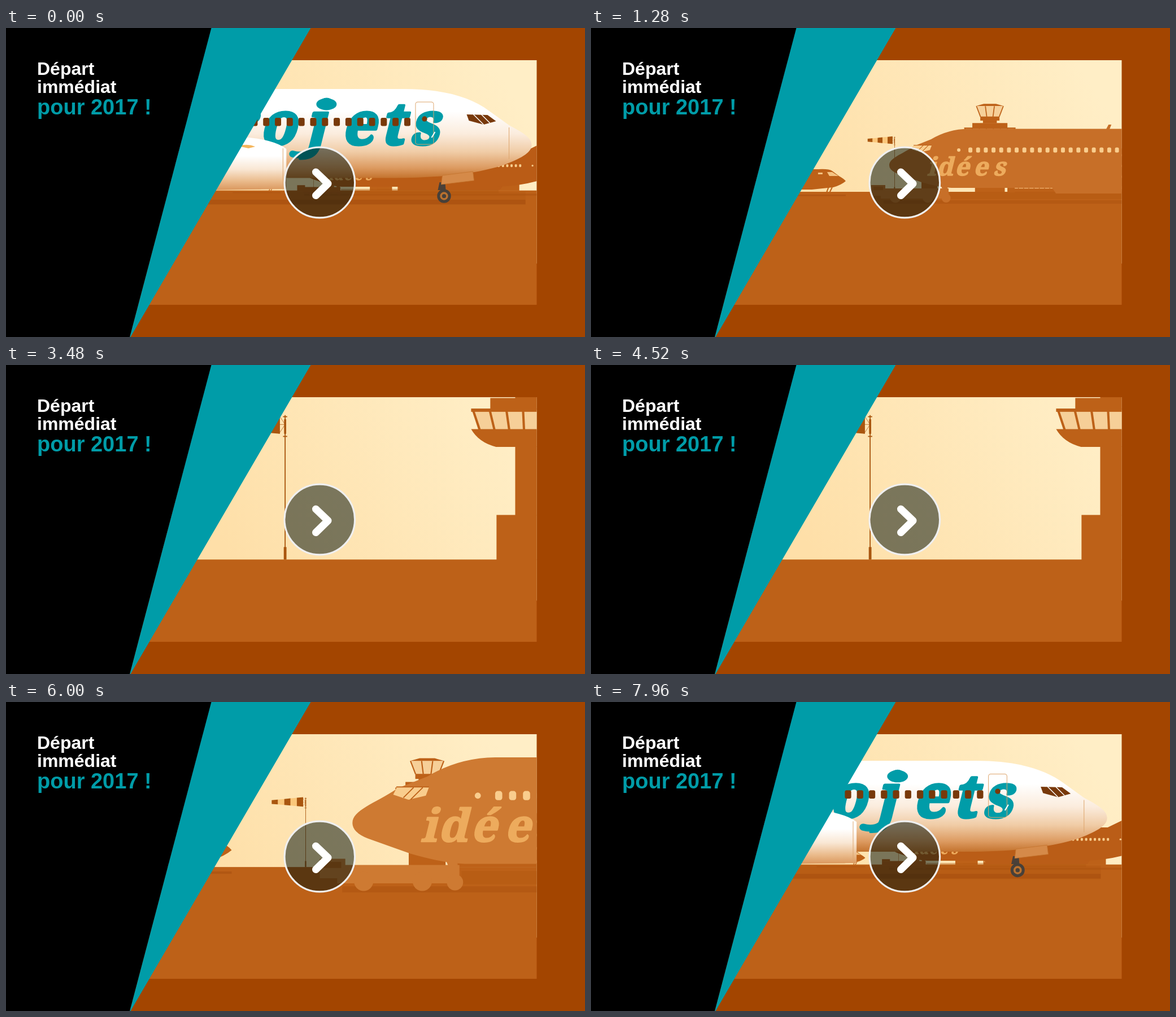
An HTML page that plays this animation: 1025 px wide and 547 px high, repeating every 8000 ms.

```html
<!DOCTYPE html>
<html lang="fr">
<head>
<meta charset="utf-8">
<title>Départ immédiat</title>
<style>
html, body { margin: 0; width: 100%; height: 100%; overflow: hidden; background: #a34500; }
svg { display: block; width: 100%; height: 100%; }
.title { font: bold 32px "Liberation Sans", Arial, sans-serif; }
.script { font-family: "Noto Serif", serif; font-weight: 900; stroke-linejoin: round; }
</style>
</head>
<body>
<svg viewBox="0 0 1025 547" preserveAspectRatio="none">
  <defs>
    <clipPath id="screen"><rect x="200" y="57" width="739.5" height="433"/></clipPath>
    <linearGradient id="sky" gradientUnits="userSpaceOnUse" x1="860" y1="57" x2="400" y2="345">
      <stop offset="0" stop-color="#ffeec6"/><stop offset="1" stop-color="#fedfa8"/>
    </linearGradient>
    <linearGradient id="hull" gradientUnits="userSpaceOnUse" x1="0" y1="108" x2="0" y2="267">
      <stop offset=".25" stop-color="#fff"/><stop offset=".5" stop-color="#fbecdd"/>
      <stop offset=".7" stop-color="#f0cca6"/><stop offset=".88" stop-color="#dc9a60"/>
      <stop offset="1" stop-color="#c2702a"/>
    </linearGradient>
    <linearGradient id="engine" gradientUnits="userSpaceOnUse" x1="0" y1="193" x2="0" y2="288">
      <stop offset=".35" stop-color="#fff"/><stop offset=".6" stop-color="#f9e7d4"/>
      <stop offset=".82" stop-color="#eabb8c"/><stop offset="1" stop-color="#d9955a"/>
    </linearGradient>
  </defs>
  <rect width="1025" height="547" fill="#a34500"/>
  <g clip-path="url(#screen)">
    <rect x="200" y="57" width="740" height="360" fill="url(#sky)"/>
    <rect id="ground" x="200" width="740" height="300" fill="#bd6118"/>
    <g id="tower" fill="#bd6118"></g>
    <g id="sock" fill="#a9560f"></g>
    <g id="small" fill="#bd6118"></g>
    <g id="ideas"></g>
    <g id="projects"></g>
  </g>
  <path d="M363 0H539.5L220.5 547H219Z" fill="#009ca8"/>
  <path d="M0 0H363.5L219 547H0Z"/>
  <g class="title" fill="#fff">
    <text x="55" y="83">Départ</text>
    <text x="55" y="115">immédiat</text>
    <text x="55" y="153" font-size="38" fill="#009ca8">pour 2017 !</text>
  </g>
  <circle cx="555.3" cy="273.5" r="62.3" fill="#02120c" fill-opacity=".52" stroke="#efefef" stroke-width="3.2"/>
  <path d="M548.5 255L570 275.5L548.5 296.5" fill="none" stroke="#fff" stroke-width="13" stroke-linecap="round" stroke-linejoin="round"/>
</svg>
<script>
const LOOP = 8000, HOLD = 3.43, VANISH = 540;
const $ = id => document.getElementById(id);
const repeat = (n, draw) => Array.from({ length: n }, (_, i) => draw(i)).join('');
const rect = (x, y, w, h, extra = '') => `<rect x="${x}" y="${y}" width="${w}" height="${h}" ${extra}/>`;
const path = (d, extra = '') => `<path d="${d}" ${extra}/>`;
const disc = (x, y, r, extra = '') => `<circle cx="${x}" cy="${y}" r="${r}" ${extra}/>`;
const lettering = (word, xs, y, size, color, weight) =>
  `<text class="script" transform="translate(0 ${y}) skewX(-14)" x="${xs}" font-size="${size}"
    fill="${color}" stroke="${color}" stroke-width="${weight}">${word}</text>`;

// Tower and terminal, origin at the foot of the tower
function towerArt() {
  const glass = 'fill="#f6cf98"', bar = 'stroke="#bd6118" stroke-width="2.4"';
  return path('M-34.5-210L-15-215.5H15L34.5-210Z') +
    path('M-33-210H33L23-184H-23Z', glass) +
    repeat(4, i => path(`M${-33 + i * 22}-210L${-23 + i * 15.3}-184`, bar)) +
    rect(-23.5, -184.5, 47, 10) + rect(-17, -175, 34, 7) + rect(-43, -168.5, 86, 12) +
    path('M-61-156H61L54-135H-54Z', glass) + rect(-63, -157.5, 126, 3.4) +
    repeat(8, i => path(`M${-61 + i * 17.4}-156L${-54 + i * 15.4}-135`, bar)) +
    path('M-63-136H63Q55-122 37-117.5H-37Q-55-122-63-136Z') +
    rect(-17, -118, 34, 72) + rect(-36.5, -46.5, 73, 47) +
    rect(55, -106.5, 400, 107) +
    repeat(4, i => {
      const y = -106.5 + i * 26.4;
      return path(`M56 ${y}L43.5 ${y + 14}H56Z`) +
        repeat(26, j => rect(58 + j * 12.8, y + 14.3, 11, 5, 'fill="#f3b877"'));
    });
}

function sockArt() {
  return rect(-.5, -139, 1, 139) + rect(-1.3, -12, 2.6, 12) + rect(-1, -135, 2, 14) +
    rect(-2, -138, 4, 1) + rect(-2, -119, 4, 1) +
    path('M-6-139L0-130L-6-121M-6-130H0', 'stroke="#a9560f" stroke-width=".4" fill="none"') +
    repeat(5, i => {
      const x = -68 + i * 12.6, top = -134 - i * 1.2, low = -126.5 + i * 1.1;
      return path(`M${x} ${top}L${x + 12.6} ${top - 1.2}V${low + 1.1}L${x} ${low}Z`, i % 2 ? 'fill="#fac77a"' : '');
    });
}

function smallArt() {
  return path('M-140-40H-48Q-30-41-24-37L-12-28Q-3-23 0-19Q-8-12-22-8L-60-4H-140Z') +
    path('M-33-35H-24L-13-28H-29Z', 'fill="#f4c382"') + rect(-49, -34, 8, 3, 'fill="#f4c382"') +
    path('M-30-9L-35 4M-24-8L-30 4', 'stroke="#bd6118" stroke-width="2"') + disc(-32, 3, 3.2) +
    rect(-140, 5, 140, 2.6, 'fill="#aa510f" opacity=".6"');
}

// Left-facing aircraft and its tug, origin below the nose
function ideasArt() {
  const light = 'fill="#f9cd8d"';
  return rect(-10, 15, 760, 6, 'fill="#a9500f" opacity=".45"') +
    rect(107, 0, 500, 13, 'fill="#b0570f" opacity=".4"') +
    rect(57, -17, 28, 17, 'fill="#bd6118"') + rect(209, -9, 13, 10, 'fill="#bd6118"') +
    path('M287-9H620L612 3H295Z') +
    path('M0-47C0-60 22-66 44-81L74-93Q104-111 140-111.5H384L388-119H393L390-111.5H675L736-141L800-230H850L815-50L736-27Q670-8 600-7H110Q88-8 57-17L15-32Q0-38 0-47Z') +
    path('M44-83L75-82L72-74L55-70L40-75Z', light) +
    path('M60-82L50-72M69-82L57-70M43-82.5H75', 'stroke="#bd6118" stroke-width="1" fill="none"') +
    disc(123, -74, 3, light) + disc(715, -74, 3, light) +
    repeat(40, i => rect(140 + i * 13.65, -78.5, 7, 9, 'rx="2.5" ' + light)) +
    lettering('idées', '67 84 116 149 184', -29, 44, '#edab5d', 1.4) +
    path('M92-10H103L104 8H99Z') +
    path('M-32-12H-7V-6H105V4L98 12H-15V7H-32Z') + rect(-28, -9, 17, 6, 'fill="#bd6118"') +
    disc(11, 10, 9.5) + disc(68.5, 10, 9.5) + disc(100.6, 11, 8);
}

// Right-facing aircraft in stage coordinates at time zero
function projectsArt() {
  const dark = 'fill="#78390a"', tan = 'stroke="#dda56d" stroke-width="1" fill="none"';
  return rect(-400, 290, 1320, 23, 'fill="#a9500f" opacity=".25"') +
    rect(-400, 304, 1320, 8, 'fill="#a34a0c" opacity=".45"') +
    path('M-400 108H705C770 108 822 121 856 147L891 172C915 185 931 194 931 207C931 219 917 229 883 242C835 258 770 265 690 265.5H-400Z', 'fill="url(#hull)"') +
    lettering('projets', '290 384 449 530 594 662 715', 206, 104, '#009ca8', 5) +
    '<ellipse cx="568" cy="135" rx="18" ry="10.5" fill="#009ca8"/>' +
    path('M554 196Q542 232 508 223', 'stroke="#009ca8" stroke-width="12" stroke-linecap="round" fill="none"') +
    repeat(36, i => rect(705.5 - i * 20.8, 159, 11, 14.5, 'rx="3" ' + dark)) +
    rect(725.5, 131, 32, 75, 'rx="4" ' + tan) + disc(741.5, 161, 4.6, dark) +
    path('M754 194L760 184', 'stroke="#fff" stroke-width="2"') +
    path('M891 176V232', tan) +
    path('M816 153L853 154L868 165L846 171L820 164Z', dark) +
    path('M828 153L846 171M842 153L857 168', 'stroke="#fff" stroke-width="1.4"') +
    path('M300 200Q380 190 420 193Q475 197 497 214V285L300 288Z', 'fill="url(#engine)"') +
    path('M491 213V286', tan) +
    path('M412 209Q428 204 442 210L430 213Z', 'fill="#f5b65c"') +
    path('M768 273L778 274L780 298H772L774 287H765Z', 'fill="#4a4038"') +
    path('M773 261L827 254L829 270L771 277Z', 'fill="#d58a49" stroke="#c5752f" stroke-width=".8"') +
    disc(776, 297.5, 9.7, 'fill="#b9712f" stroke="#474039" stroke-width="5"') +
    disc(776, 297.5, 3.6, 'fill="#474039"');
}

$('tower').innerHTML = towerArt();
$('sock').innerHTML = sockArt();
$('small').innerHTML = smallArt();
$('ideas').innerHTML = ideasArt();
$('projects').innerHTML = projectsArt();

// Size of an object while the camera travels at constant speed
const dolly = (speed, from, t) => 1 / (1 - speed * (t - from));
const mix = (a, b, k) => a + (b - a) * k;

function place(id, x, y, scale, visible = true) {
  const el = $(id);
  el.style.display = visible ? '' : 'none';
  if (visible) el.setAttribute('transform', `translate(${x} ${y}) scale(${scale})`);
}

function render(ms) {
  // Out, hold, and back along the same path
  const t = Math.min(ms, LOOP - ms, HOLD * 1000) / 1000;
  const k = Math.min(1, Math.max(0, (t - 2.32) / (HOLD - 2.32)));
  const tilt = 42 * k * k * (3 - 2 * k);

  const far = dolly(.37, 2.32, t);
  const horizon = 280.8 + 12.7 * far + tilt;
  $('ground').setAttribute('y', horizon);
  place('tower', VANISH + 230 * far, horizon, far);

  const mid = dolly(.411, 2.32, t);
  place('sock', 564 - 38 * mid, horizon, mid);

  const side = dolly(.51, 1.28, t);
  place('small', VANISH - 89 * side, horizon, side, t < 2.6);

  const near = dolly(.62, 1.28, t);
  const drift = -12 + 167 * Math.max(0, t - 1.28) ** 3.5;
  place('ideas', VANISH + drift * near, 290 + (near - 1) * 11.5 + tilt, near, t < 2.45);
  const tone = Math.min(1, t / 2);
  $('ideas').setAttribute('fill', `rgb(${mix(186, 206, tone)} ${mix(92, 122, tone)} ${mix(22, 50, tone)})`);

  const close = dolly(.55, 0, t);
  place('projects', VANISH - (VANISH + 650 * t) * close, 290 - 290 * close, close, t < .9);
}

function tick() {
  render(performance.now() % LOOP);
  requestAnimationFrame(tick);
}
tick();
</script>
</body>
</html>
```
